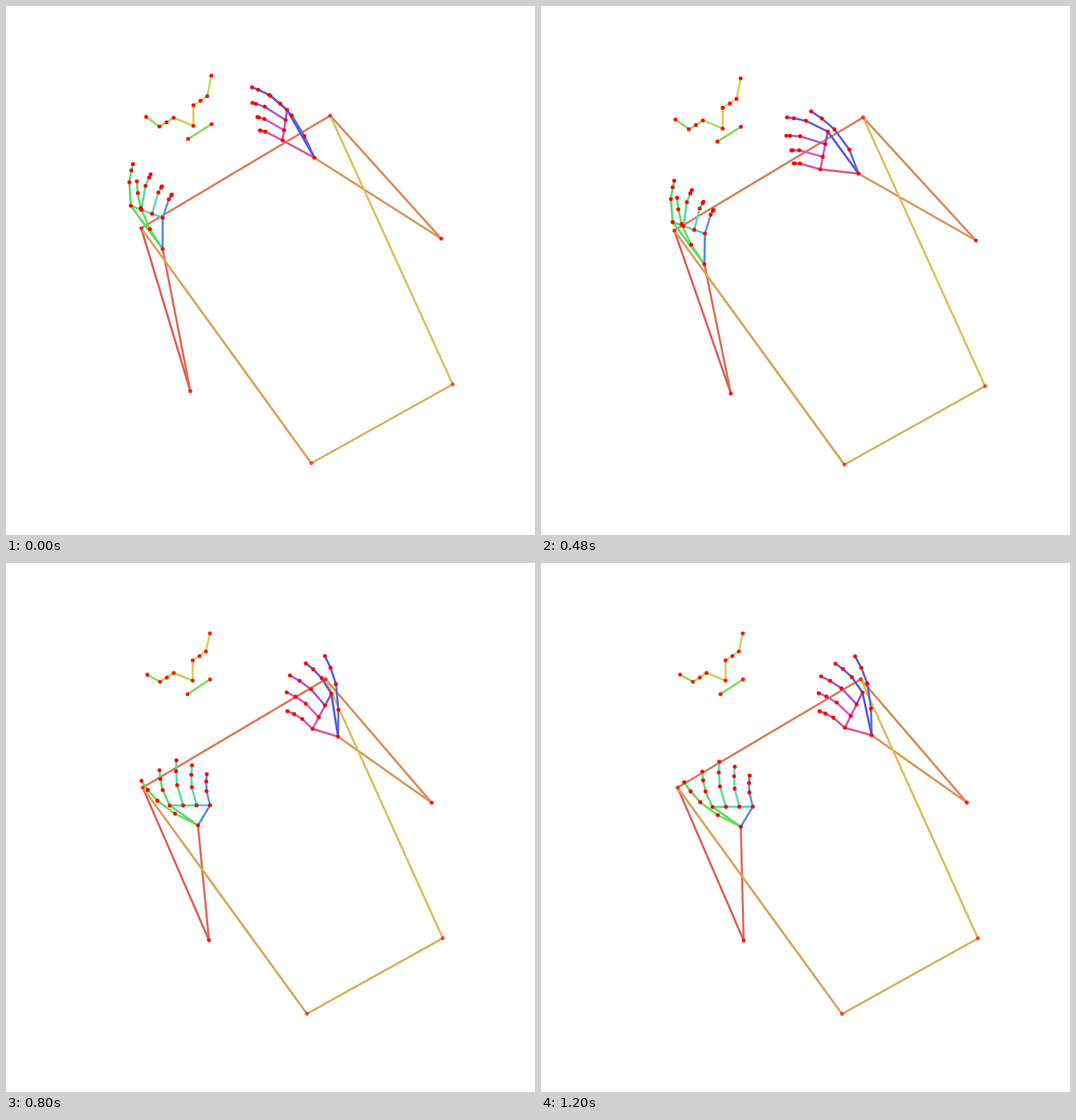
An HTML page with a canvas for the animation above (1.28 s loop, 748 by 748 pixels).

```html
<!DOCTYPE html>
<html lang="en">
<head>
<meta charset="utf-8">
<title>Pose skeleton</title>
<style>
html, body { margin: 0; width: 100%; height: 100%; overflow: hidden; background: #fff; }
canvas { display: block; }
</style>
</head>
<body>
<canvas id="stage" width="748" height="748"></canvas>
<script>
const ctx = document.getElementById('stage').getContext('2d');
const SIZE = 748, LOOP = 1280, STEP = 80, HUE_STEP = 360 / 59;

// time, left wrist, right wrist, nose, then pose position of left hand, right hand, body
const keys = [
  [0,    436, 214.5,   221.5, 343.5,  265, 169.5,    0, 0, 0],
  [160,  442, 214,     215.5, 350,    265.5, 170,    .4, 0, 0],
  [480,  449, 237,     231, 365,      257, 173.2,    1, .05, 1],
  [560,  450, 237,     232, 365,      258, 172.5,    1.1, .1, 1.05],
  [640,  458.5, 238.5, 249.5, 366.5,  263.7, 170.5,  1.64, .55, 1.45],
  [800,  469.5, 245.5, 271.5, 371,    264, 166.3,    2, 1, 1.86],
  [960,  467, 237.5,   278, 371,      262, 165.8,    2.08, 1.12, 2],
  [1200, 467.5, 243.5, 282.5, 373,    261, 166.3,    1.9, 1, 1.84]
];

// left shoulder, right shoulder, left elbow, right elbow, left hip, right hip
const bodyPoses = [
  [458.5, 155, 191.2, 314.2, 615.5, 329, 260.7, 544.7, 631.7, 535, 431.7, 646.5],
  [455.5, 157.5, 188.5, 317.5, 615, 331.5, 268.5, 548, 628, 537.5, 429, 648.5],
  [451.5, 165.5, 194, 317.5, 599.8, 340.2, 290, 531, 616, 529.5, 425, 635.5]
];

// Offsets from the nose: left eye to ear, right eye to ear, mouth corners.
const face = [
  0, -29.3, 10, -35.5, 19.5, -42, 25.3, -71,
  -28, -11.5, -38, -5, -48, 1, -66.8, -12.7, -7.5, 18.5, 25.7, -2.5
];

// Offsets from the wrist: thumb base, index knuckle, pinky knuckle,
// then the tips from thumb to pinky.
const leftHand = {
  bow: .07,
  hues: [229, 241, 270, 303, 328],
  poses: [
    [-14, -30.5, -38.5, -67.5, -45, -24.5, -62, -87.5, -88, -99.5, -87.5, -77.5, -80.5, -57.5, -77, -38.5],
    [-13, -34, -43.5, -59.5, -54, -6, -67, -88, -101, -79.5, -102, -53.5, -95, -33, -91.5, -14.5],
    [.5, -38, -9.5, -60.5, -36, -11, -18.5, -114, -45.5, -103.5, -68, -86.5, -72.5, -62.5, -71.5, -36]
  ]
};
const rightHand = {
  bow: -.065,
  hues: [108, 128, 150, 162, 206],
  poses: [
    [-18, -28, -45, -61, 0, -44, -36.5, -95.5, -42, -120, -17, -105.5, -1, -88.5, 13, -77],
    [-32.5, -16.5, -40, -28, 17, -28.5, -80, -63, -54.5, -78, -30.5, -92, -8.5, -85, 12.5, -72.5]
  ]
};

const clamp = (v, lo, hi) => Math.min(hi, Math.max(lo, v));
const mix = (a, b, k) => a + (b - a) * k;
const mixRow = (a, b, k) => a.map((v, i) => mix(v, b[i], k));
const mixPoint = mixRow;

function sample(t) {
  let i = 0;
  while (i < keys.length - 2 && t >= keys[i + 1][0]) i++;
  const u = (t - keys[i][0]) / (keys[i + 1][0] - keys[i][0]);
  return mixRow(keys[i], keys[i + 1], u * u * (3 - 2 * u));
}

function pairs(row) {
  return row.flatMap((x, i) => i % 2 ? [] : [[x, row[i + 1]]]);
}

// Blends neighbouring poses at a fractional position, slightly past the last too.
function blend(poses, at) {
  const i = clamp(Math.floor(at), 0, poses.length - 2);
  return pairs(mixRow(poses[i], poses[i + 1], at - i));
}

const shift = (pts, [ox, oy]) => pts.map(([x, y]) => [ox + x, oy + y]);

function line(a, b, hue) {
  ctx.strokeStyle = `hsl(${hue}, 65%, 60%)`;
  ctx.beginPath();
  ctx.moveTo(...a);
  ctx.lineTo(...b);
  ctx.stroke();
}

function chain(pts, hue, step) {
  for (let i = 1; i < pts.length; i++) line(pts[i - 1], pts[i], hue + (i - 1) * step);
}

function dots(pts, alpha) {
  ctx.fillStyle = `rgba(255, 0, 0, ${alpha})`;
  for (const [x, y] of pts) {
    ctx.beginPath();
    ctx.arc(x, y, 2.8, 0, 2 * Math.PI);
    ctx.fill();
  }
}

// Joints of a bowed digit; a curled one has its outer joints bunched at the tip.
function digit(base, tip, curl, bow) {
  const dx = tip[0] - base[0], dy = tip[1] - base[1];
  const first = .46 + Math.min(.32, curl);
  const second = 1 - .8 * (1 - first) ** 2;
  return [0, first, second, 1].map(r => {
    const side = bow * Math.sin(Math.PI * r);
    return [base[0] + dx * r - dy * side, base[1] + dy * r + dx * side];
  });
}

function drawHand({ poses, bow, hues }, wrist, at) {
  const [thumb, index, pinky, ...tips] = shift(blend(poses, at), wrist);
  const curl = clamp(poses.length - 1 - at, 0, 1);
  const digits = tips.map((tip, i) => {
    const base = i ? mixPoint(index, pinky, (i - 1) / 3) : thumb;
    return digit(base, tip, .1 * i * curl, bow);
  });
  digits.forEach((d, i) => {
    if (i < 2) line(wrist, d[0], hues[i]);
    else line(digits[i - 1][0], d[0], mix(hues[i - 1], hues[i], .6));
    chain(d, hues[i] + 3, 3);
  });
  line(wrist, pinky, hues[4] + 10);
  return [wrist, ...digits.flat()];
}

function draw(t) {
  const [, lx, ly, rx, ry, nx, ny, leftAt, rightAt, bodyAt] = sample(t);
  const lw = [lx, ly], rw = [rx, ry], nose = [nx, ny];
  const [ls, rs, le, re, lh, rh] = blend(bodyPoses, bodyAt);

  // Nodding narrows the face and drops the ears.
  const nod = clamp(bodyAt - 1, 0, 1);
  const head = shift(pairs(face).map(([x, y], i) =>
    [x * (1 - .045 * nod), y + (i % 4 === 3 ? 5 : .8) * nod]), nose);

  ctx.fillStyle = '#fff';
  ctx.fillRect(0, 0, SIZE, SIZE);
  ctx.lineWidth = 3;

  const torso = [[rs, re], [re, rw], [rs, ls], [ls, le], [le, lw], [rs, rh], [rh, lh], [ls, lh]];
  torso.forEach(([a, b], i) => line(a, b, 3.6 + i * HUE_STEP));
  chain([nose, ...head.slice(0, 4)], 52, HUE_STEP);
  chain([nose, ...head.slice(4, 8)], 77, HUE_STEP);
  line(head[8], head[9], 101);
  const hands = [...drawHand(rightHand, rw, rightAt), ...drawHand(leftHand, lw, leftAt)];

  dots([lh, rh], .65);
  dots([ls, rs], .75);
  dots([le, re], .85);
  dots([nose, ...head], mix(.95, .87, nod));
  dots(hands, 1);
}

function tick(now) {
  draw(Math.floor(now % LOOP / STEP) * STEP);
  requestAnimationFrame(tick);
}
draw(0);
requestAnimationFrame(tick);
</script>
</body>
</html>
```
